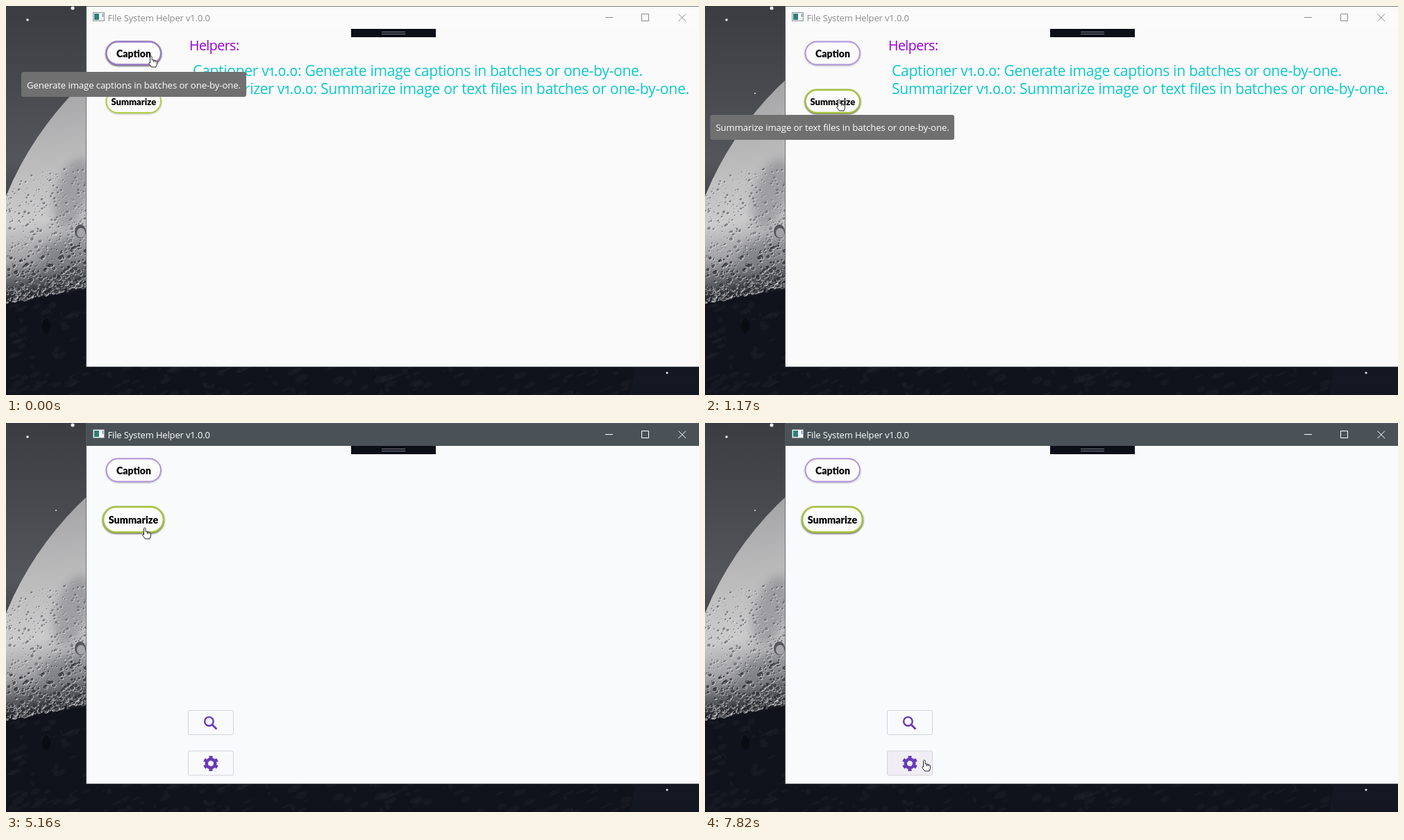
Write an HTML page with a canvas that moves like this. It is 998 by 561 pixels and loops after 8 s.

```html
<!DOCTYPE html>
<html lang="en">
<head>
<meta charset="utf-8">
<title>File System Helper</title>
<style>
html, body { margin: 0; width: 100%; height: 100%; overflow: hidden; background: #11141d; }
canvas, svg { position: absolute; left: 0; top: 0; }
text { font-family: "Open Sans", "Noto Sans", sans-serif; font-variant-numeric: oldstyle-nums; white-space: pre; }
.title { font-size: 13px; letter-spacing: -.15px; font-variant-numeric: normal; }
.head { font-size: 19.5px; letter-spacing: -.5px; fill: #9400d3; }
.line { font-size: 21px; letter-spacing: -.26px; fill: #0cc8cc; }
.tip rect { fill: #707070; }
.tip text { font-size: 13.2px; letter-spacing: -.11px; fill: #fff; text-anchor: middle; }
.pill text { font: 900 14px Lato, "Open Sans", sans-serif; text-anchor: middle; fill: #000; }
.pill rect { fill: #fcfcfd; stroke-width: 2; filter: drop-shadow(0 1px 1px #0004); }
.pill.hot rect { stroke-width: 2.3; filter: drop-shadow(0 1.5px 1px #000a); }
#caption.hot rect { stroke: #977bc4; }
#summarize.hot rect { stroke: #a6c23c; }
.box { stroke: #d3d3d9; }
.icon { fill: none; stroke: #673ab7; }
</style>
</head>
<body>
<canvas id="sky" width="998" height="561"></canvas>
<svg width="998" height="561" viewBox="0 0 998 561">
  <rect id="body" x="116" width="884" height="520"/>
  <rect id="bar" x="116" width="884" height="33"/>
  <path d="M116 .5H998M115.500 0V520.500H998" stroke="#5a5e66" stroke-opacity=".8" fill="none"/>
  <rect x="125.500" y="9.500" width="16" height="12" fill="#f4f6f7" stroke="#8d9499"/>
  <rect x="127" y="11" width="7" height="9" fill="#2f7f78"/>
  <path d="M139.500 11v5" stroke="#3a6ea5"/>
  <text id="title" class="title" x="146.500" y="21.500">File System Helper v1.0.0</text>
  <path id="controls" d="M863 16.500h11M915.500 11.500h10v10h-10zM968.500 11.500l10.500 10.500M979 11.500l-10.500 10.500" fill="none"/>
  <rect x="497" y="33" width="122" height="12" fill="#0c0f18"/>
  <path d="M541 37.500h34M541 40.500h34" stroke="#7c8088"/>

  <g id="intro">
    <text class="head" x="264" y="64">Helpers:</text>
    <text class="line" x="269" y="101">Captioner v1.0.0: Generate image captions in batches or one-by-one.</text>
    <text class="line" x="269" y="126.500">Summarizer v1.0.0: Summarize image or text files in batches or one-by-one.</text>
  </g>

  <g id="caption" class="pill">
    <rect x="144.500" y="51.500" width="78.500" height="33" rx="16.500" stroke="#b195dc"/>
    <text x="184" y="74">Caption</text>
  </g>
  <g id="summarize" class="pill">
    <rect x="-39.200" y="-16.500" width="78.500" height="33" rx="16.500" stroke="#b2cf45"/>
    <text y="5" style="font-size:13px">Summarize</text>
  </g>

  <g id="tools">
    <rect id="browse" class="box" x="262.500" y="414.500" width="65" height="35" rx="2"/>
    <g class="icon" stroke-width="2.400">
      <circle cx="292.400" cy="430.400" r="6.300"/>
      <path d="M297 435l6.400 6.400" stroke-width="2.800"/>
    </g>
    <rect id="settings" class="box" x="262.500" y="473" width="65" height="35" rx="2"/>
    <g class="icon" transform="translate(295 491) rotate(15)">
      <circle r="6.200" stroke-width="4.600"/>
      <circle r="9.300" stroke-width="3.400" pathLength="12" stroke-dasharray="1 1"/>
    </g>
  </g>

  <g id="tipCaption" class="tip"><rect x="22" y="95" width="324" height="36" rx="3"/>
    <text x="184" y="118.500">Generate image captions in batches or one-by-one.</text></g>
  <g id="tipSummary" class="tip"><rect x="7.500" y="157" width="351.500" height="36" rx="3"/>
    <text x="183.500" y="180">Summarize image or text files in batches or one-by-one.</text></g>
  <g id="tipBrowse" class="tip"><rect x="249.500" y="460.500" width="91" height="36" rx="3"/>
    <text x="295.500" y="484">Browse files.</text></g>

  <g id="cursor" fill="#fff" stroke="#222" stroke-linejoin="round">
    <path id="hand" d="M-4.500 2V-6.500a1.300 1.300 0 0 1 2.600 0V-2.500l5.500 1.200q1.800.5 1.800 2.200V4L4 8H-2.500L-6 3.500Q-6.500 1-4.500 2ZM.5-1.800V1M2.800-1.300V1"/>
    <path id="arrow" d="M-3-8V5l3-2.800 2 4.800 2-.9-2-4.600h4Z"/>
  </g>
</svg>
<script>
const $ = id => document.getElementById(id);

function drawSky() {
  const c = $('sky').getContext('2d');
  let seed = 7;
  const rand = () => (seed = seed * 16807 % 2147483647) / 2147483647;
  const blob = (x, y, rx, ry, fill, turn = 0) => {
    c.fillStyle = fill;
    c.beginPath();
    c.ellipse(x, y, rx, ry, turn, 0, 7);
    c.fill();
  };
  const ramp = (x0, y0, x1, y1, stops) => {
    const g = c.createLinearGradient(x0, y0, x1, y1);
    stops.forEach(([at, color]) => g.addColorStop(at, color));
    return g;
  };

  c.fillStyle = ramp(0, 0, 0, 561, [[0, '#3b3c42'], [.4, '#55565b'], [.75, '#171a23'], [1, '#131722']]);
  c.fillRect(0, 0, 998, 561);
  [[96, 3, 2.6], [31, 20, 1.8], [72, 126, 1], [952, 529, 1.6]]
    .forEach(([x, y, r]) => blob(x, y, r, r, '#e8e8ea'));

  // Moon, lit from the upper left
  c.save();
  c.beginPath();
  c.arc(438, 453, 473, 0, 7);
  c.clip();
  c.fillStyle = ramp(20, 130, 70, 418, [[0, '#a6a6a8'], [.35, '#bcbcbd'], [.62, '#cbcbcc'],
    [.8, '#a0a0a3'], [.92, '#55565b'], [1, '#10131b']]);
  c.fillRect(0, 0, 998, 561);
  c.filter = 'blur(7px)';
  blob(96, 270, 24, 52, '#85858a99', .3);
  blob(82, 352, 36, 16, '#66676c77', -.3);
  c.filter = 'none';
  for (let i = 0; i < 950; i++) {
    const x = rand() * 118, depth = rand() ** 1.7;
    const y = 428 - x * .22 - depth * 180, r = .4 + rand() ** 3 * 2.6 * (1 - depth * .6);
    blob(x + .8, y + .9, r * 1.4, r, '#ececec99', -.5);
    blob(x, y, r * 1.2, r, depth < .35 ? '#17181eb0' : '#505156a0', -.5);
  }
  blob(107, 325, 8, 10, '#55565b');
  blob(108, 327, 6, 7, '#a4a4a6');
  for (let i = 0; i < 90; i++) {
    const x = rand() * 118;
    blob(x, 410 - x * .2 + rand() * 20, 1.8, .9, '#b4b4b780', -.5);
  }
  for (let i = 0; i < 420; i++)
    blob(rand() * 905, 430 + rand() * 131, 1 + rand() * 10, 1 + rand() * 4, '#2c2e3838', -.4);
  blob(58, 461, 6, 11, '#080a10cc');
  c.restore();
}

const cursorPath = [
  [0, 212, 80], [100, 212, 80], [460, 200, 110], [890, 196, 143], [5070, 196, 143],
  [5160, 203, 159], [5248, 238, 222], [5336, 283, 308], [5424, 302, 358], [5512, 311, 400],
  [5680, 315, 432], [7280, 315, 432], [7500, 318, 455], [7800, 319, 494]
];
const bursts = [0, 190, 1080, 4070, 5160, 6160, 7370];
const STEP = 88, LOOP = 8000;

// Linear track through [time, ...values] keys
function track(keys, t) {
  const i = keys.findIndex(k => k[0] > t);
  if (i < 0) return keys.at(-1).slice(1);
  if (!i) return keys[0].slice(1);
  const a = keys[i - 1], b = keys[i], p = (t - a[0]) / (b[0] - a[0]);
  return a.slice(1).map((v, j) => v + (b[j + 1] - v) * p);
}
const fade = (t, ...keys) => track(keys, t)[0];
const show = (id, opacity) => $(id).setAttribute('opacity', opacity);

function render(time) {
  // The screen refreshes in coarse steps within each burst of change
  const start = bursts.findLast(s => s <= time);
  const t = start + Math.floor((time - start) / STEP) * STEP;

  const active = t >= 4070, page = t >= 4158;
  const fill = page ? '#f9fafc' : active ? '#f9f9f9' : '#fafafa';
  $('body').setAttribute('fill', fill);
  $('bar').setAttribute('fill', active ? '#4a5257' : '#fbfbfb');
  $('title').setAttribute('fill', active ? '#fff' : '#8b8b8b');
  $('controls').setAttribute('stroke', active ? '#fff' : '#8b8b8b');

  const [x, y] = track(cursorPath, t);
  const overCaption = y < 86;
  const overSummary = y > 119 && y < 160 && x < 228;
  const overBrowse = y > 414 && y < 450;
  const overSettings = y > 473;
  const hand = overCaption || overSummary || overBrowse || overSettings;
  $('cursor').setAttribute('transform', `translate(${x} ${y})`);
  show('hand', +hand);
  show('arrow', +!hand);

  $('caption').classList.toggle('hot', overCaption);
  $('summarize').classList.toggle('hot', overSummary || page);
  const grow = fade(t, [4070, 0], [4500, 1]);
  $('summarize').setAttribute('transform',
    `translate(${183.8 - grow * .4} ${137.5 + grow * 1.7}) scale(${1 + grow * .105})`);
  $('browse').setAttribute('fill', overBrowse ? '#f0edf5' : fill);
  $('settings').setAttribute('fill', overSettings ? '#f0edf5' : fill);

  show('intro', +!page);
  show('tools', fade(t, [4070, 0], [4420, 1]));
  show('tipCaption', fade(t, [190, 1], [400, 0]));
  show('tipSummary', fade(t, [990, 0], [1168, 1], [4070, 1], [4300, 0]));
  show('tipBrowse', fade(t, [6070, 0], [6248, 1], [7370, 1], [7580, 0]));
}

function loop(now) {
  render(now % LOOP);
  requestAnimationFrame(loop);
}

drawSky();
render(0);
requestAnimationFrame(loop);
</script>
</body>
</html>
```
